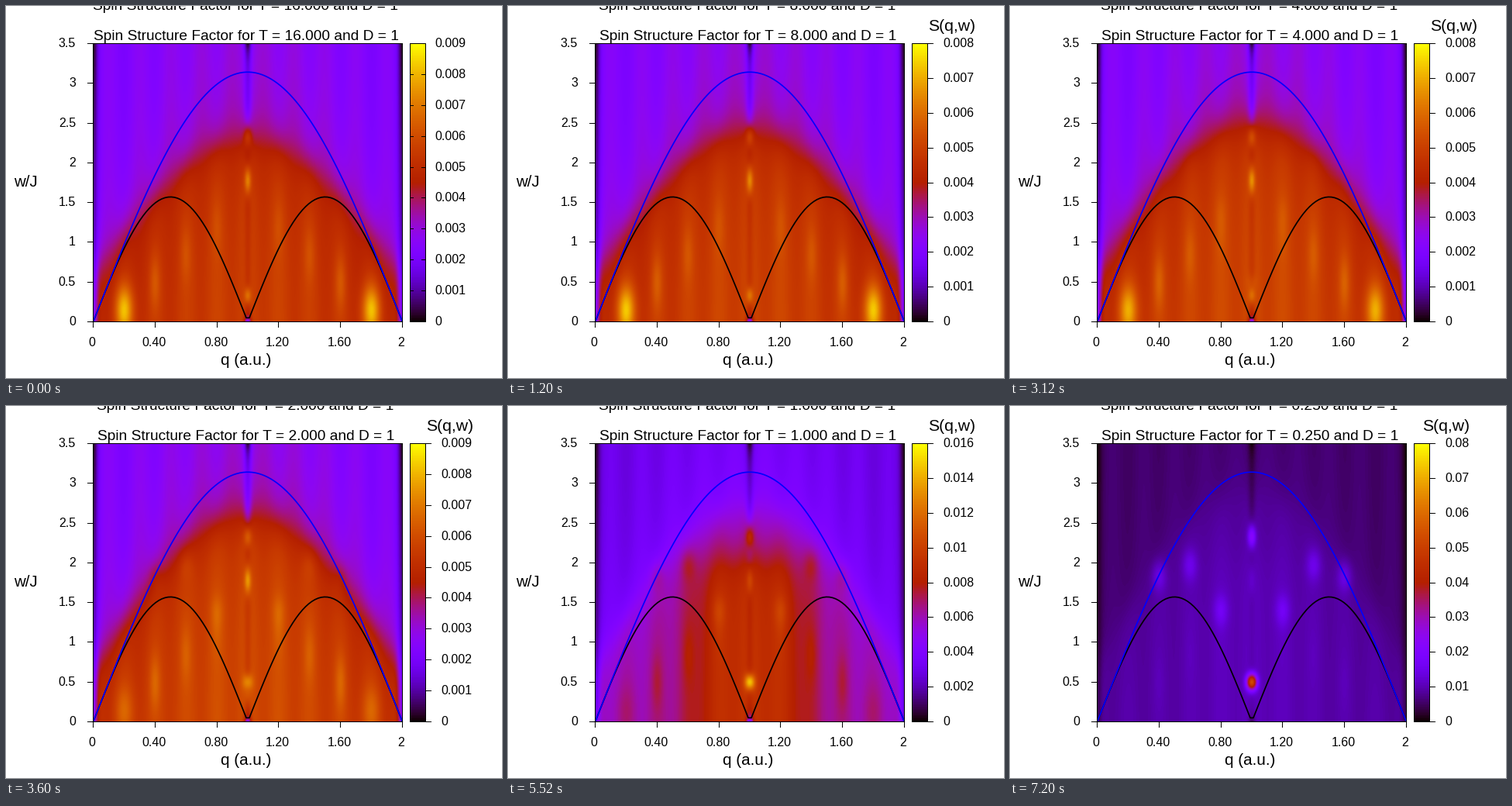
Recreate the animation shown at these times as a matplotlib script. Size 640x480 px, loop 8 s.

```python
import math

import numpy as np
import matplotlib.pyplot as plt
from matplotlib.animation import FuncAnimation
from matplotlib.patches import Rectangle

W, H, DPI = 640, 480, 100
LEFT, RIGHT, TOP, BOTTOM = 112, 511, 48, 407
BAR_L, BAR_R = 521, 541
Q_MAX, W_MAX = 2.0, 3.5
PX = 72 / DPI
HOLD = 3  # animation steps per temperature; the last one is cut short

# Upper end of the colour scale; the temperature halves from 16 each time
SCALE_TOPS = [.009, .008, .008, .009, .016, .04, .08]

plt.rcParams["font.family"] = "Liberation Sans"


def logistic(x):
    return 1 / (1 + np.exp(-x))


def bell(x, width):
    return np.exp(-(x / width) ** 2)


def spots(heat, cold, gain):
    """Bright modes as (q, w, width in q, width in w, strength)."""
    yield .2, .15, .06, .32, .33 * heat
    for n in (2, 3, 4):
        yield .2 * n, .35 * n - .2, .035, .35, .2 / n * gain
    for q, w in ((.4, 1.83), (.6, 1.97), (.8, 1.4)):
        yield q, w, .045, .19, .07 * cold
    yield 1, .33, .022, .1, .18 * heat
    yield 1, .5, .033, .1, .58 * cold * (1 - .5 * gain)
    yield 1, 1.78, .022, .17, .25 * gain
    yield 1, 2.33, .025, .13, .17


def intensity(temp, top):
    """Structure factor as a fraction of the colour range."""
    q = np.linspace(0, Q_MAX, RIGHT - LEFT + 1)[None, :]
    w = np.linspace(W_MAX, 0, BOTTOM - TOP + 1)[:, None]
    q = 1 - abs(q - 1)
    arch = np.sin(np.pi * q / 2)
    gain = min(1, .009 / top)
    heat = 1 - math.exp(-(temp / 3) ** 2)
    level = math.log2(temp)

    # Background, and a continuum with a soft upper edge
    base = .255 * gain ** .6
    depth = (2.7 - .1 * level) * (.26 + .74 * arch) - w
    inside = .6 * logistic(depth / .15) + .4 * logistic(depth / .6)
    v = base + gain * (.05 * arch ** 2 + (.37 - .012 * level) * inside)
    v += .1 * base * np.cos(10 * np.pi * q) * (2 * inside - 1)
    v += (1.2 * gain ** 2 * (1 - gain) * np.exp(-((1 - q) / .38) ** 3)
          * logistic((2.05 - w) / .16))

    # Weak column at q = 1
    dim = (.1 + .25 * logistic((w - 2.6) / .06)
           + .5 * np.exp(-w / .08) + .55 * np.exp((w - W_MAX) / .15))
    v *= 1 - dim * bell(1 - q, .024)

    for sq, sw, dq, dw, amp in spots(heat, 1 - heat, gain):
        v += amp * bell(q - sq, dq) * bell(w - sw, dw)
    return v * (1 - bell(q, .03) * (.5 + .4 * (w / W_MAX) ** 2))


def tick_step(top):
    """Largest 1, 2 or 5 times a power of ten that gives at least 8 steps."""
    raw = top / 8 * 1.0001
    power = 10 ** math.floor(math.log10(raw))
    return max(m * power for m in (1, 2, 5) if m * power <= raw)


fig = plt.figure(figsize=(W / DPI, H / DPI), dpi=DPI, facecolor="white")
ax = fig.add_axes([0, 0, 1, 1])


def text(x, y, s, size, ha="center"):
    return ax.text(x, y, s, fontsize=size * PX, ha=ha, va="baseline", color="black")


def line(xs, ys, color="black", width=1, z=4):
    return ax.plot(xs, ys, color=color, lw=width * PX, zorder=z, snap=False,
                   solid_capstyle="butt")[0]


def hline(x0, x1, y):
    return line([x0, x1], [y + .5] * 2)


def box(x0, x1):
    ax.add_patch(Rectangle((x0 + .5, TOP + .5), x1 - x0, BOTTOM - TOP, fill=False,
                           ec="black", lw=PX, snap=False, zorder=4))


def picture(data, x0, x1):
    return ax.imshow(data, cmap="gnuplot", vmin=0, vmax=1, aspect="auto",
                     interpolation="nearest", zorder=1,
                     extent=(x0, x1 + 1, BOTTOM + 1, TOP))


def to_x(q):
    return LEFT + q / Q_MAX * (RIGHT - LEFT)


def to_y(w, top=W_MAX):
    return BOTTOM - w / top * (BOTTOM - TOP)


def draw_fixed():
    picture(np.linspace(1, 0, BOTTOM - TOP + 1)[:, None], BAR_L, BAR_R)
    box(LEFT, RIGHT)
    box(BAR_L, BAR_R)
    for k in range(8):
        y = round(to_y(k / 2))
        hline(LEFT - 7, LEFT, y)
        text(90, y + 5, f"{k / 2:g}", 16, "right")
    for k in range(6):
        x = round(to_x(.4 * k))
        line([x + .5] * 2, [BOTTOM, BOTTOM + 8])
        text(x - 1, 439, f"{.4 * k:.2f}" if 0 < k < 5 else f"{.4 * k:g}", 16)
    text(25, 233, "w/J", 20.5)
    text(309.5, 463, "q (a.u.)", 20.8)

    q = np.linspace(0, Q_MAX, 100)
    lower = np.pi / 2 * abs(np.sin(np.pi * q))
    upper = np.pi * np.sin(np.pi * q / 2)
    line(to_x(q) + .5, to_y(lower) + .5, "black", 1.7, 2)
    line(to_x(q) + .5, to_y(upper) + .5, "blue", 1.7, 3)


def draw_phase(temp, top, labelled):
    title = f"Spin Structure Factor for T = {temp:.3f} and D = 1"
    group = [picture(intensity(temp, top), LEFT, RIGHT),
             text(310, 44, title, 19.17),
             text(309, 5, title, 19.17)]

    step = tick_step(top)
    values = [n * step for n in range(round(top / step) + 1)]
    labels = [f"{v:g}" for v in values]
    for value, label in zip(values, labels):
        y = round(to_y(value, top))
        if labelled:
            group.append(hline(BAR_R, BAR_R + 8, y))
        else:
            group += [hline(BAR_L, BAR_L + 5, y), hline(BAR_R - 5, BAR_R, y)]
        group.append(text(561.5 if labelled else 553.5, y + 5, label, 16, "left"))
    if labelled:
        group.append(text(522.5 + 10 * max(map(len, labels)), 32, "S(q,w)", 21.2))
    return group


draw_fixed()
groups = [draw_phase(16 / 2 ** k, top, labelled=k > 0)
          for k, top in enumerate(SCALE_TOPS)]
ax.set_xlim(0, W)
ax.set_ylim(H, 0)
ax.axis("off")


def update(i):
    for k, group in enumerate(groups):
        for artist in group:
            artist.set_visible(k == i // HOLD)
    return []


anim = FuncAnimation(fig, update, frames=20, interval=400, init_func=lambda: update(0),
                     repeat=True, repeat_delay=0, blit=False)
plt.show()
```
